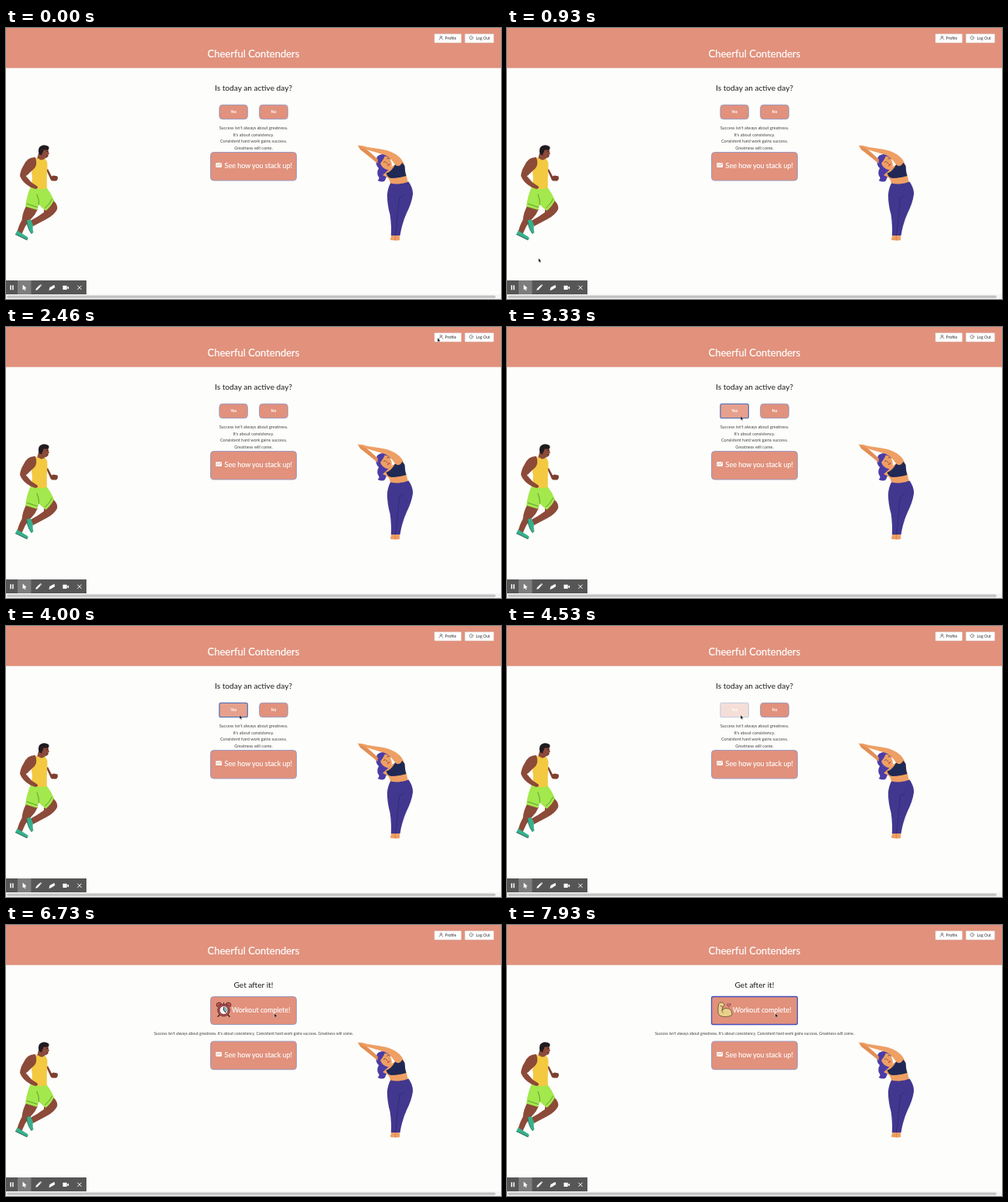
An HTML page that plays this animation: 640x350 px, repeating every 8000 ms.

```html
<!DOCTYPE html>
<html lang="en">
<head>
<meta charset="utf-8">
<title>Activity page</title>
<style>
  html, body { margin: 0; width: 100%; height: 100%; overflow: hidden; background: #fdfdfb; }
  svg { display: block; width: 640px; height: 350px; }
  text { font-family: Lato, "Open Sans", sans-serif; text-anchor: middle; }
  .title { font-size: 13px; fill: #fff; stroke: #fff; stroke-width: .2; }
  .head { font-size: 10.15px; fill: #1c1c1c; }
  .big { font-size: 8.95px; fill: #fff; stroke: #fff; stroke-width: .15; text-anchor: start; }
  .copy { font-size: 5.5px; fill: #444; }
  .wide { font-size: 5.04px; }
  .nav { font-size: 5.2px; fill: #333; text-anchor: start; }
  .small { font-size: 5.2px; font-weight: 700; fill: #fff; }
  .btn { fill: #e1917c; stroke: #9c99bd; stroke-width: 1; }
  .line { fill: none; stroke-linecap: round; stroke-linejoin: round; }
</style>
</head>
<body>
<svg viewBox="0 0 640 350">
  <defs>
    <g id="stack">
      <rect class="btn" x="264.5" y="0.5" width="111" height="36.5" rx="4"/>
      <rect x="271.3" y="14.2" width="7.6" height="5.8" rx=".6" fill="#fff"/>
      <path class="line" d="M272.6 17.8l1.6-1.4 1.3 1.2 2.4-2.2" stroke="#e1917c" stroke-width=".9"/>
      <text class="big" x="282.6" y="21">See how you stack up!</text>
    </g>
  </defs>

  <rect width="640" height="350" fill="#fdfdfb"/>
  <rect width="640" height="51.7" fill="#e1917c"/>
  <text class="title" x="320" y="38.4">Cheerful Contenders</text>

  <g fill="#fff" stroke="#d9d3d0" stroke-width=".5">
    <rect x="554" y="7.7" width="34.6" height="11.4" rx=".6"/>
    <rect x="593.4" y="7.7" width="37.2" height="11.4" rx=".6"/>
  </g>
  <g class="line" stroke="#444" stroke-width=".6">
    <circle cx="562.4" cy="11.5" r="1.2"/>
    <path d="M560 15.1c.2-3 4.6-3 4.8 0M603.3 11.2a2.3 2.3 0 1 0 0 2.9M601.6 12.7h2.8"/>
  </g>
  <text class="nav" x="567.6" y="14.8">Profile</text>
  <text class="nav" x="607.6" y="14.8">Log Out</text>

  <!-- runner -->
  <g>
    <path fill="#7d402f" d="M52 183L56.500 193Q58 198 61 197.500L65 197.500Q68 195 66.500 191.500L61.500 190.500L59 191.500L54 182Z"/>
    <path fill="#8c4a39" d="M26 230L41 234Q38 241 33 246Q28 251 24.500 257L20 267L14.500 263Q16.500 255 20.500 248Q21.500 238 26 230Z"/>
    <path fill="#36b08c" d="M14.500 261.500L20 265L28 270Q29.500 272 27 274L12 266.500Z"/>
    <path class="line" stroke="#2c5148" stroke-width=".8" d="M12.300 266.600L27 273.600"/>
    <path fill="#8c4a39" d="M49 235L61 222.500Q67.500 228.500 66 234.500Q62 242 52 247L35 256L30.500 249.500Q41 244 49 238Z"/>
    <path fill="#36b08c" d="M31.500 247L35 254.500Q34 260 35.500 264L33 266Q27.500 259 26.500 248.500Z"/>
    <path class="line" stroke="#2c5148" stroke-width=".7" d="M26.700 249Q28 260 32.900 265.500"/>
    <path fill="#a3e84c" d="M32.500 204L52.500 206Q58 213 62 222.500Q58 231 51.500 236Q46 232 42.500 228L40 235L25 230.500Q27 215 32.500 204Z"/>
    <path class="line" stroke="#4f8a2c" stroke-width=".8" d="M42.500 228Q43 221 40 215M27 227L40.500 231.500M50.500 232.500Q56 228 59.500 221"/>
    <path fill="#8c4a39" d="M42 162L50 164L51 173L39 173Z"/>
    <path fill="#f3c941" d="M37 168.500Q40 168 42 168.500Q46 172.500 50 168.500Q54 172 53.500 178Q52.500 191 52.800 207Q42 209.500 32 206Q35 196 33 187Z"/>
    <path fill="#8c4a39" d="M38 167Q41 176 37 181Q31 187 25.500 191L33 199.500L40.500 204.500Q42 207.500 38 208L31.500 205.500Q21 199.500 18 191Q18.500 184 23 177Q28 166 38 167Z"/>
    <path class="line" stroke="#6c3427" stroke-width=".6" d="M25.500 191L29 188.500M38 204.500L40.500 206"/>
    <path fill="#8c4a39" d="M45 156Q51 153 54.500 156L55 160L56 162.500L54.500 163.500Q54.500 168 50.500 168L44 166Z"/>
    <path fill="#211b20" d="M42.500 163Q40.500 155 45 152.500Q50 150 55 153Q56.500 156 54 157.500L48.500 157.500L47.500 161Q46 161 46.500 164.500Z"/>
    <path class="line" stroke="#211b20" stroke-width=".7" d="M52.300 159.500L54 159.300M52.800 165.200L54.500 164.900"/>
  </g>

  <!-- stretcher -->
  <g>
    <path fill="#4b3ca6" d="M481 165Q489 160 497 168L495 184Q493 190 490 197Q487 200 480.500 197Q484 194 481 191Q479 186 482 181Q477 177 479 170Q478.500 167 481 165Z"/>
    <path fill="#e38f55" d="M455 152L462 153.500Q472 161 483 172L480.500 175Q467 164 458 157Z"/>
    <path fill="#ee9f64" d="M487 190Q496 182 500 178L508 176L517 188L520.500 202L497 203Q497 196 493 193Z"/>
    <path fill="#ee9f64" d="M454 151.500L461 152L467 153.800L485 156.500Q501 159 509 167Q515 173 516 183L506 182Q500 169 490 164L466 157Z"/>
    <path fill="#ee9f64" d="M483 168.500Q488 163 495 167.500Q500 173 498.500 180Q496 185 490 182Q483 178 483 168.500Z"/>
    <path fill="#4b3ca6" d="M480.500 173Q481 163 490 164.500Q488 171 481 178Z"/>
    <path class="line" stroke="#47292c" stroke-width=".7" d="M488.500 173.500l1.800-1M493 169l1.800-.8M491.500 173.800l1.500 1"/>
    <path class="line" stroke="#c73a3d" stroke-width="1.200" d="M493.500 177.500l2.200-1.600"/>
    <path fill="#202955" d="M491.500 187.500Q496 187 501 180L503 176.500Q508 181 512.500 174L515.500 178Q516 187 517.500 191Q507 194 498 194Q493 193 491.500 187.500Z"/>
    <path fill="#ee9f64" d="M498 266H509V272Q510 274.500 505.500 274.500L497.500 274Q496 272 498 270Z"/>
    <path fill="#42378f" d="M497 200.500Q509 203 520.500 198.500Q526.500 207 526 215Q524.500 226 518 239Q512 252 509.500 268H497.800Q498.500 254 496.500 241Q493 229 492.800 216Q493.500 207 497 200.500Z"/>
    <path class="line" stroke="#312872" stroke-width=".8" d="M508.500 220Q507.500 232 506 243Q505.500 256 503.500 267.500M508.500 220L514 216"/>
    <path class="line" stroke="#c4763f" stroke-width=".6" d="M503.300 268.500V274"/>
  </g>

  <g id="ask">
    <text class="head" x="320" y="81">Is today an active day?</text>
    <g id="yes">
      <rect class="btn" x="275.900" y="99.300" width="36.400" height="18.400" rx="4"/>
      <text class="small" x="294.100" y="109.900">Yes</text>
    </g>
    <g id="no">
      <rect class="btn" x="327.700" y="99.300" width="36.600" height="18.400" rx="4"/>
      <text class="small" x="346" y="109.900">No</text>
    </g>
    <g class="copy">
      <text x="320" y="130.800">Success isn't always about greatness.</text>
      <text x="320" y="139.500">It's about consistency.</text>
      <text x="320" y="148.200">Consistent hard work gains success.</text>
      <text x="320" y="157">Greatness will come.</text>
    </g>
    <use href="#stack" y="160"/>
  </g>

  <g id="go">
    <text class="head" x="320" y="81">Get after it!</text>
    <rect id="done" class="btn" x="264.500" y="92.500" width="111" height="36" rx="4"/>
    <text class="big" x="292" y="113">Workout complete!</text>
    <g id="clock" stroke="#3b2530" stroke-width=".9">
      <path class="line" stroke-width="1.500" d="M276 116l-2 2.300M287 116l2 2.300"/>
      <path fill="#e2514a" d="M273 105.500Q270.800 101 275 100.300Q277.500 100 278.500 101.500ZM290 105.500Q292.200 101 288 100.300Q285.500 100 284.500 101.500Z"/>
      <path d="M281.500 100v3"/>
      <circle cx="281.500" cy="110" r="7.700" fill="#e2514a"/>
      <circle cx="281.500" cy="110" r="5.600" fill="#f3f5f3"/>
      <path fill="#8bc5b5" stroke-width=".4" d="M281.500 110V106.200A3.800 3.800 0 0 1 284.200 112.700Z"/>
      <path class="line" stroke-width="1" d="M281.500 106.500v3.500l2.300 2.800"/>
    </g>
    <g id="arm" stroke="#5a4930" stroke-width=".8" stroke-linejoin="round">
      <path fill="#ead18a" d="M273.500 102Q275 99.500 278.500 100L281 102Q281.500 104.500 279 105.500L278 110Q282 106 286.500 108Q291 110 291 115.500Q289 118.500 281 118.500Q274.500 118 273 114Q272.500 108 273.500 102Z"/>
      <path class="line" d="M278 110Q277.500 112.500 279.500 113.500M276 104.500l3 1"/>
      <path fill="#e46c7a" stroke-width=".6" d="M286.800 106Q283.800 103.800 284.500 102.200Q285.600 100.800 286.800 102.400Q288.200 100.800 289.300 102.200Q289.800 103.800 286.800 106Z"/>
    </g>
    <text class="copy wide" x="320" y="141.600">Success isn't always about greatness. It's about consistency. Consistent hard work gains success. Greatness will come.</text>
    <use href="#stack" y="149.700"/>
  </g>

  <rect y="344" width="640" height="6" fill="#f5f5f4"/>
  <rect x="1" y="345.400" width="632" height="3.400" rx="1.700" fill="#c1c1c1"/>
  <rect y="326" width="104" height="18" fill="#565656"/>
  <rect x="15" y="326" width="17.500" height="18" fill="#7d7d7d"/>
  <g fill="#fff">
    <path d="M5.300 332.300h1.500v6h-1.500zM8.200 332.300h1.500v6h-1.500z"/>
    <path d="M21.600 331.500v7l1.700-1.500 1.200 2.300 1-.5-1.100-2.200 2.200-.3z"/>
    <path d="M38.300 338.800l.6-2.300 4.600-4.500 1.600 1.600-4.500 4.600zM44 331.500l.7-.6 1.600 1.600-.7.700z"/>
    <path d="M55.500 339l1-4 6-3.300.8 3.300-5.200 3.300z"/>
    <rect x="73.500" y="332.700" width="5.200" height="5.400" rx=".6"/>
    <path d="M78.500 335.400l2.600-2v4z"/>
  </g>
  <path class="line" stroke="#fff" stroke-width="1" d="M92.700 333l4.600 4.600M97.300 333l-4.600 4.600"/>

  <path id="cursor" d="M0 0V5.200L1.200 4.200L2 6L2.900 5.600L2.100 3.900H3.700Z" fill="#111" stroke="#fff" stroke-width=".35"/>
</svg>
<script>
const LOOP = 8000, SWITCH = 4640, CLICK = 7300;
const $ = id => document.getElementById(id);
const yes = $("yes"), no = $("no"), cursor = $("cursor"), done = $("done");
const yesBox = yes.firstElementChild;

// Pointer trips: time, x, y
const trips = [
  [[800, 9, 331], [1400, 269, 55.3], [2200, 269, 55.3], [2500, 572, 12],
   [2680, 608, 13], [3050, 302, 115], [4600, 302, 115], [4770, 330, 352]],
  [[6060, 330, 335], [6560, 347, 114], [8000, 347, 114]]
];

const clamp = v => Math.max(0, Math.min(1, v));
const ease = v => { v = clamp(v); return v * v * (3 - 2 * v); };
const show = (el, on) => el.setAttribute("visibility", on ? "visible" : "hidden");

function pointer(t) {
  const trip = trips.find(p => t >= p[0][0] && t <= p[p.length - 1][0]);
  show(cursor, !!trip);
  if (!trip) return;
  const i = trip.findIndex((p, k) => k && t <= p[0]);
  const a = trip[i - 1], b = trip[i];
  const k = ease((t - a[0]) / (b[0] - a[0]));
  const at = n => a[n] + (b[n] - a[n]) * k;
  cursor.setAttribute("transform", `translate(${at(1)} ${at(2)})`);
}

function pose(el, cx, scale, opacity) {
  el.setAttribute("transform", `translate(${cx} 108.5) scale(${scale}) translate(${-cx} -108.5)`);
  el.setAttribute("opacity", opacity);
}

function focus(box, on, color) {
  box.style.stroke = on ? color : "";
  box.style.strokeWidth = on ? 1.3 : "";
  box.setAttribute("rx", on ? 2 : 4);
}

function draw(t) {
  const asking = t < SWITCH;
  show($("ask"), asking);
  show($("go"), !asking);

  const pulse = ease((t - 1150) / 330) * (1 - ease((t - 1580) / 380));
  const size = 1 + 0.1 * pulse, glow = 1 - 0.25 * pulse;
  const fade = 1 - 0.68 * ease((t - 4000) / 500);
  pose(yes, 294.1, size, glow * fade);
  pose(no, 346, size, glow);
  yesBox.style.fill = t > 3000 ? "#e6a08d" : "";
  focus(yesBox, t > 3180, "#5c74b4");

  show($("clock"), !asking && t < CLICK);
  show($("arm"), t >= CLICK);
  focus(done, t >= CLICK, "#4451bd");
  pointer(t);
}

const start = performance.now();
function tick() {
  draw((performance.now() - start) % LOOP);
  requestAnimationFrame(tick);
}
tick();
</script>
</body>
</html>
```
